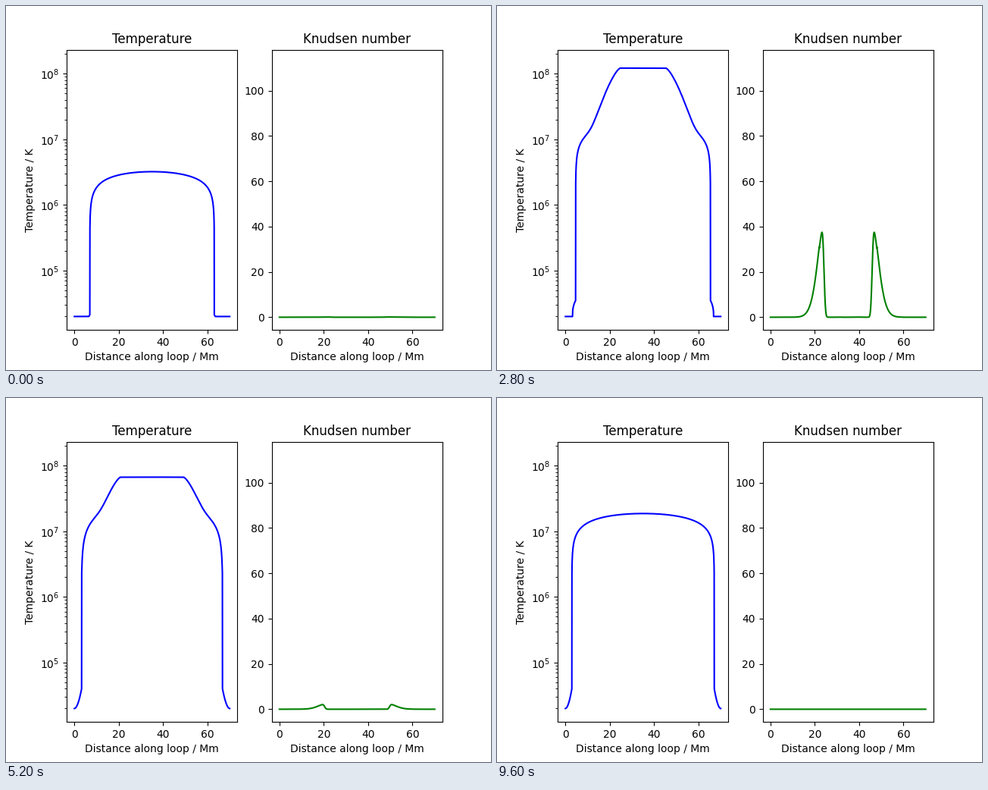
A matplotlib script that plays this animation: 640 px wide and 480 px high, repeating every 10000 ms.

```python
import numpy as np
import matplotlib.pyplot as plt
from matplotlib.animation import FuncAnimation

FRAMES, STEP_MS = 25, 400
LENGTH, MID = 70, 35
PEAK = 5                 # frame at which the heating stops
SHOCK = 22               # position of the short-lived shock, Mm
BASE = np.log10(2e4)     # chromospheric temperature

x = np.linspace(0, LENGTH, 1401)
half = np.minimum(x, LENGTH - x)      # distance from the nearer footpoint


def near_peak(frame, rate):
    return np.exp(-rate * (frame - PEAK) ** 2)


def top_level(frame):
    """log10 of the loop-top temperature: heating ramp, then cooling."""
    if frame <= PEAK:
        return np.log10(3.21e6 + 1.447e8 * (frame / PEAK) ** 2.12)
    return np.interp(frame, [5, 13, 17, 21, 24], [8.170, 7.824, 7.559, 7.373, 7.270])


def foot_level(frame, edge):
    """Chromosphere: base level rising towards the transition region."""
    keys = [0, 5, 9, 13]
    start = np.interp(frame, keys, [6.4, 4.6, 1.8, 0])
    height = np.interp(frame, keys, [0.03, 0.22, 0.27, 0.3])
    power = np.interp(frame, keys, [2, 0.05, 0.7, 1.9])
    s = np.clip((half - start) / (edge - start), 0, 1)
    return BASE + height * s ** power


def temperature(frame):
    top = top_level(frame)
    edge = 2.9 + 4.05 * np.exp(-(frame / 7.7) ** 1.7)

    # conduction dome between the two transition regions
    crest = min(7.5 - 0.993 * np.exp(-frame / 5.2), top)
    power = 0.35 + 0.15 * np.exp(-((frame - 14.5) / 4.5) ** 2)
    u = (MID - half) / (MID - edge)
    dome = 10 ** (crest + power * np.log10(np.clip(1 - u * u, 1e-9, 1)))

    # hot plateau, joined so that the loop top reaches its level
    front = np.interp(frame, [0, 5, 9, 13, 17], [28, 27.5, 22, 20.8, 18.5])
    hot = (10 ** (4 * top) - 10 ** (4 * crest)) ** 0.25
    hot = hot * np.exp(-(np.maximum(front - half, 0) / 7.4) ** 1.42)
    level = np.log10(dome ** 4 + hot ** 4) / 4

    d = half - SHOCK
    level += 0.035 * near_peak(frame, 1) * np.tanh(d / 0.2) * np.exp(-np.abs(d))
    foot = foot_level(frame, edge)
    return 10 ** np.where(half > edge, np.maximum(level, foot), foot)


def knudsen(frame):
    keys = [0, 5, 9, 13, 24]
    height = np.exp(np.interp(frame, keys, np.log([0.1, 112.4, 12.5, 2.05, 0.004])))
    pos = np.interp(frame, keys, [21, 26.2, 20.2, 19.4, 13.5])
    outer = np.interp(frame, keys, [3, 2.75, 3.9, 3.7, 3])
    inner = np.interp(frame, keys, [2, 1.04, 1.32, 1.2, 1.5])
    d = half - pos
    k = height * np.where(d < 0, np.exp(-(np.abs(d) / outer) ** 1.48),
                          np.exp(-(np.abs(d) / inner) ** 2.5))

    # spike at the shock, its skirt and a faint ripple inside the hot region
    e = half - SHOCK
    k += 87 * near_peak(frame, 2) * np.exp(-(e / 0.15) ** 2)
    k += 5 * near_peak(frame, 0.4) * np.exp(-(e / 4.3) ** 2) * (e <= 0)
    k += 0.45 * near_peak(frame, 0.5) * np.exp(-((half - 30) / 2) ** 4)
    return k


fig, (ax_t, ax_k) = plt.subplots(1, 2, figsize=(6.4, 4.8), dpi=100)
line_t, = ax_t.plot(x, temperature(0), color="blue")
line_k, = ax_k.plot(x, knudsen(0), color="green")

ax_t.set_yscale("log")
ax_t.set_ylim(10 ** 4.096, 10 ** 8.364)
ax_k.set_ylim(-5.623, 118.08)
ax_t.set_title("Temperature")
ax_k.set_title("Knudsen number")
ax_t.set_ylabel("Temperature / K")
for ax in (ax_t, ax_k):
    ax.set_xlim(-3.5, 73.5)
    ax.set_xlabel("Distance along loop / Mm")


def update(frame):
    line_t.set_ydata(temperature(frame))
    line_k.set_ydata(knudsen(frame))
    return line_t, line_k


anim = FuncAnimation(fig, update, frames=FRAMES, interval=STEP_MS,
                     repeat=True, repeat_delay=0)
plt.show()
```
